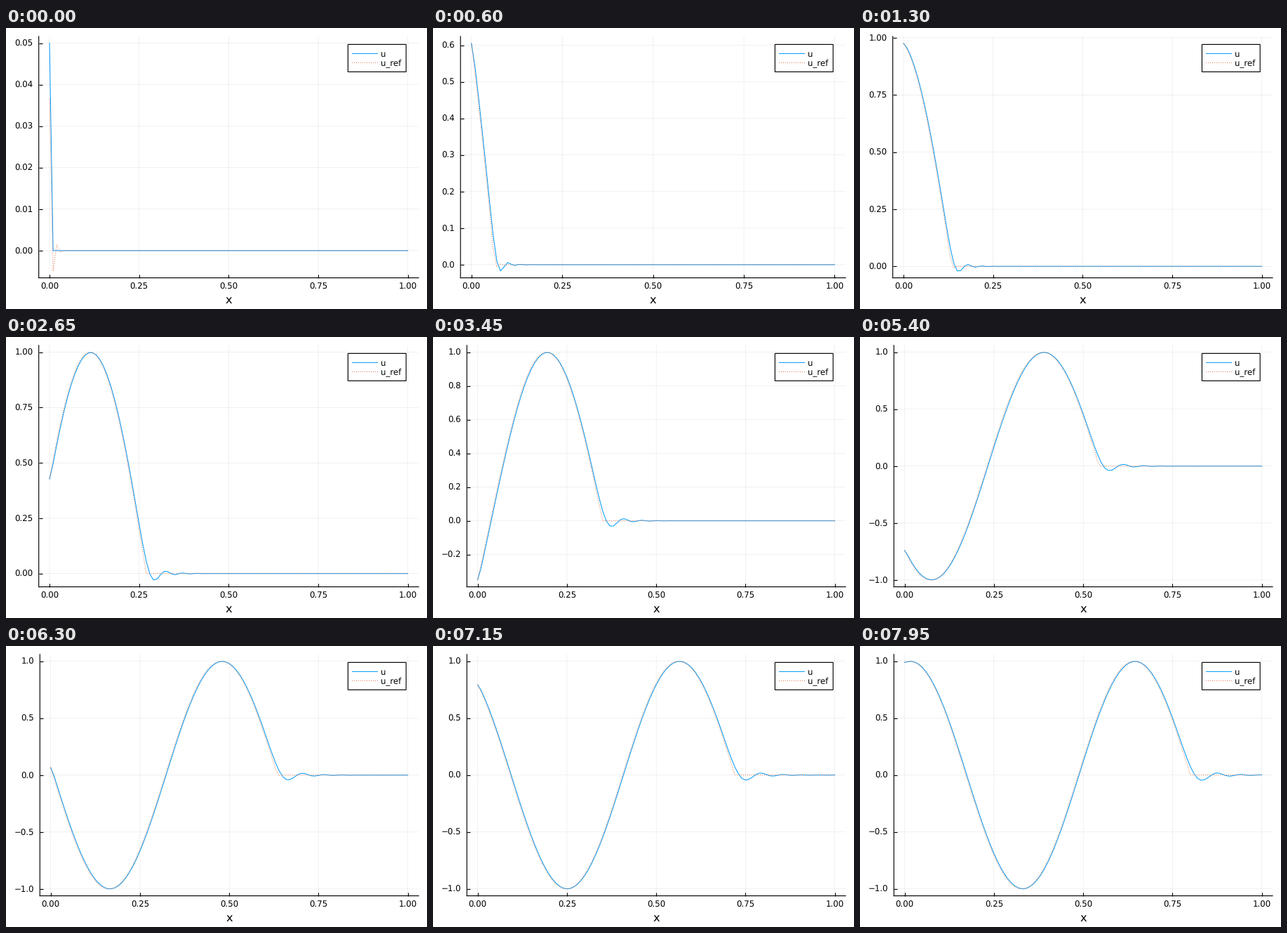
These frames come from a looping animation (600 px wide and 400 px high, 8000 ms). A matplotlib script:

```python
import math

import numpy as np
import matplotlib.pyplot as plt
from matplotlib.animation import FuncAnimation
from matplotlib.patches import Rectangle

W, H, DPI = 600, 400, 100
PX = 72 / DPI
FRAMES, INTERVAL = 160, 50
BLUE, ORANGE = "#009AFA", "#E26F47"
TOP, BOTTOM, RIGHT = 11.9, 355.6, 588.0
DOTS = (0, (1, 2))
THIN, FRAME = 1.0 * PX, 1.15 * PX

plt.rcParams.update({
    "font.family": "DejaVu Sans",
    "font.size": 8.5,
    "text.hinting": "none",
    "path.snap": False,
})

# Advection u_t + u_x = 0 with inflow sin(10 t), linear finite elements
N, DT = 100, 0.005
DX = 1 / N
x = np.linspace(0, 1, N + 1)


def assemble(local):
    a = np.zeros((N + 1, N + 1))
    for i in range(N):
        a[i:i + 2, i:i + 2] += local
    return a


mass = assemble(DX / 6 * np.array([[2, 1], [1, 2]]))
drift = assemble(0.5 * np.array([[-1, 1], [-1, 1]]))
stiff = assemble(np.array([[1, -1], [-1, 1]]) / DX)
mass_inv = np.linalg.inv(mass)


def project(t):
    """L2 projection of the exact wave, two Gauss points per cell."""
    load = np.zeros(N + 1)
    for s in (0.5 - 0.5 / math.sqrt(3), 0.5 + 0.5 / math.sqrt(3)):
        p = x[:-1] + s * DX
        f = np.where(p < t, np.sin(10 * (t - p)), 0) * DX / 2
        load[:-1] += f * (1 - s)
        load[1:] += f * s
    return mass_inv @ load


def solve():
    """Taylor-Galerkin steps; the inflow node is set after each one."""
    lhs = mass.copy()
    lhs[0] = 0
    lhs[0, 0] = 1
    rhs = -(DT * drift + DT ** 2 / 2 * stiff)
    rhs[0] = 0
    step = np.linalg.solve(lhs, rhs)
    u = np.zeros(N + 1)
    out = []
    for n in range(1, FRAMES + 1):
        u = u + step @ u
        u[0] = math.sin(10 * n * DT)
        out.append((u, project(n * DT)))
    return out


states = solve()


def nice_ticks(lo, hi):
    """Tick step with the best mix of count, zero, coverage and roundness."""
    span = hi - lo
    top = math.ceil(math.log10(span))
    best = None
    for z in range(top, top - 3, -1):
        for q, nice in ((1, 1), (5, 0.9), (2, 0.7), (2.5, 0.5), (3, 0.2)):
            step = q * 10.0 ** z
            a, b = math.ceil(lo / step), math.floor(hi / step)
            count = b - a + 1
            if not 4 <= count <= 8:
                continue
            score = (0.25 * (1 - abs(count - 5) / 5)
                     + (1 / 6 if a <= 0 <= b else 0)
                     + 0.5 * span / ((count - 1) * step)
                     + 0.25 * nice)
            key = (round(score, 9), step)
            if best is None or key > best[0]:
                best = key, a, b
    (_, step), a, b = best
    digits = 1
    while abs(round(step, digits) - step) > 1e-9:
        digits += 1
    values = [i * step for i in range(a, b + 1)]
    labels = [f"{v:.{digits}f}".replace("-", "\u2212") for v in values]
    return values, labels, digits


fig = plt.figure(figsize=(W / DPI, H / DPI), dpi=DPI, facecolor="white")
ax = fig.add_axes([0.1, 0.1, 0.8, 0.8])
for side in ("top", "right"):
    ax.spines[side].set_visible(False)
for side in ("left", "bottom"):
    ax.spines[side].set_linewidth(FRAME)
ax.set_axisbelow(True)
ax.grid(True, color="black", alpha=0.1, linewidth=0.55 * PX)
ax.tick_params(direction="in", length=5 * PX, width=FRAME)
ax.tick_params(axis="x", pad=7.3 * PX)
ax.tick_params(axis="y", pad=8 * PX)
ax.set_xlim(-0.03, 1.03)
ax.set_xticks([0, 0.25, 0.5, 0.75, 1], ["0.00", "0.25", "0.50", "0.75", "1.00"])
line_u, = ax.plot([], [], color=BLUE, lw=THIN)
line_ref, = ax.plot([], [], color=ORANGE, lw=THIN, ls=DOTS,
                    dash_capstyle="butt")

# Overlay in pixels for the legend and the axis name
over = fig.add_axes([0, 0, 1, 1])
over.set_xlim(0, W)
over.set_ylim(H, 0)
over.axis("off")
over.add_patch(Rectangle((487.4, 23.4), 82.8, 39, fc="white", ec="black",
                         lw=FRAME))
for y, name, color, style in ((36.4, "u", BLUE, "-"),
                              (49.4, "u_ref", ORANGE, DOTS)):
    over.plot([493, 530], [y, y], color=color, lw=THIN, ls=style,
              solid_capstyle="butt", dash_capstyle="butt")
    over.text(534, y + 4.2, name, va="baseline")
x_name = over.text(317, 391.5, "x", fontsize=11.7, ha="center", va="baseline")


def draw(n):
    u, ref = states[n]
    line_u.set_data(x, u)
    line_ref.set_data(x, ref)
    lo, hi = min(u.min(), ref.min()), max(u.max(), ref.max())
    pad = 0.03 * (hi - lo)
    lo, hi = lo - pad, hi + pad
    values, labels, digits = nice_ticks(lo, hi)
    ax.set_yticks(values, labels)
    ax.set_ylim(lo, hi)
    # The axis moves right with the width of the widest label
    left = 46.7 + 7.5 * (digits - 2) + (9.1 if values[0] < 0 else 0)
    ax.set_position([left / W, 1 - BOTTOM / H,
                     (RIGHT - left) / W, (BOTTOM - TOP) / H])
    x_name.set_x((left + RIGHT) / 2)
    return line_u, line_ref


anim = FuncAnimation(fig, draw, frames=FRAMES, interval=INTERVAL,
                     init_func=lambda: draw(0), repeat=True, repeat_delay=0,
                     blit=False)
plt.show()
```
